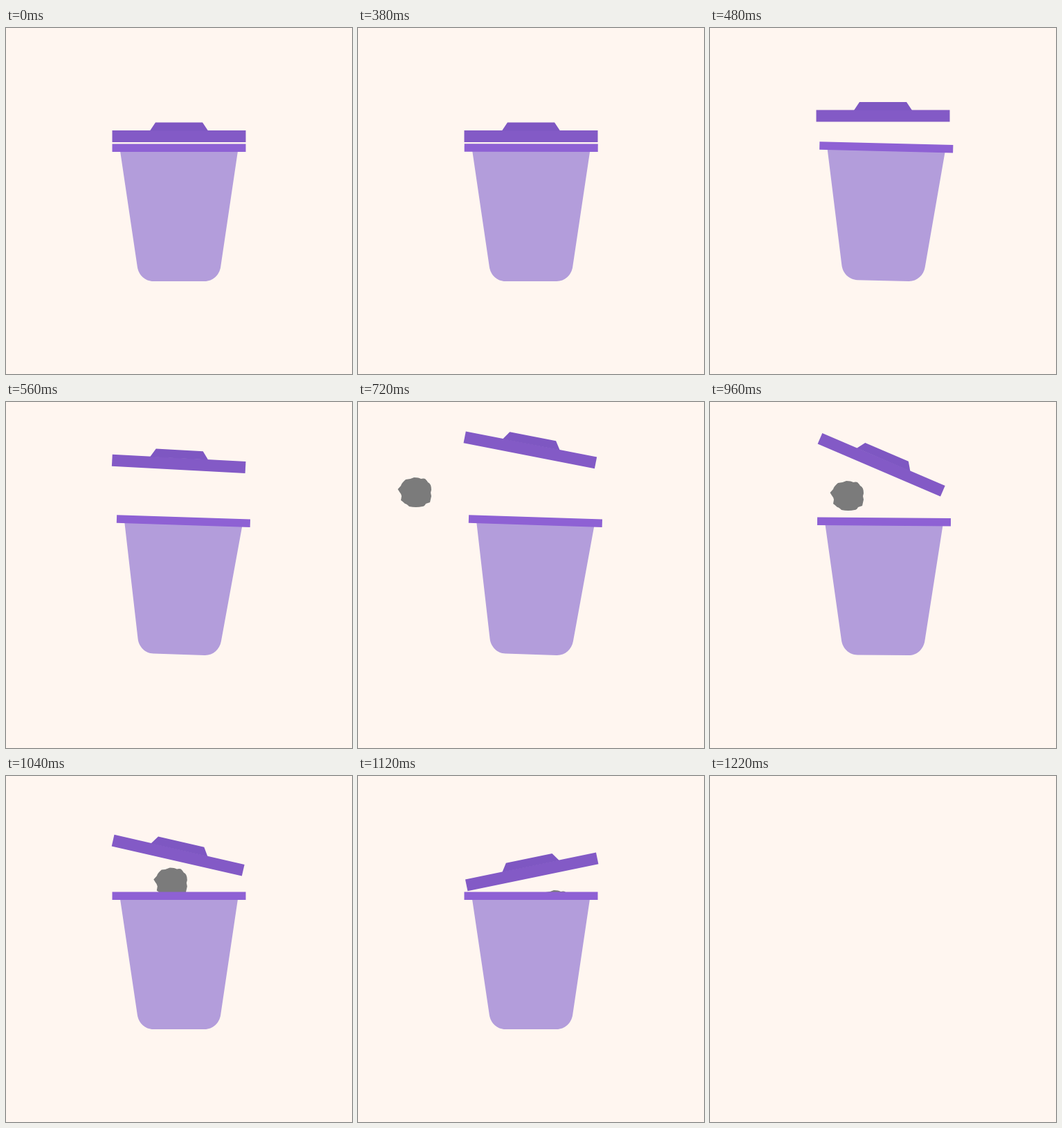
Recreate the animation shown at these times as an HTML page. Size 500 by 500 pixels, loop 1240 ms.

```html
<!DOCTYPE html>
<html lang="en">
<head>
<meta charset="utf-8">
<title>Bin</title>
<style>
  html, body { margin: 0; height: 100%; overflow: hidden; background: #fff6f0; }
  svg { display: block; width: 100%; height: 100%; }
</style>
</head>
<body>
<svg viewBox="0 0 500 500">
  <g id="scene">
    <path id="ball" fill="#7b7b7b" d="M-24.5-5L-20-10Q-19-14-13-19Q-7-19-1-22Q6-22 9-20Q13-21 15-20Q18-17 19-15Q24-13 24-4L23 0L24 5L22 14L16 16Q14 20 11 20Q2 22-8 20Q-12 16-14 16Q-17 13-20 11L-19 5Q-20 1-22-1Z"/>
    <g id="bin">
      <path fill="#b39ddb" d="M165 178L189.8 345C191.5 357 201 366 213 366H287C299 366 308.5 357 310.2 345L335 178Z"/>
      <path fill="#8e61d4" d="M153.5 167.5H346.5V179H153.5Z"/>
    </g>
    <g id="lid">
      <path fill="#835ac6" d="M153.5 148H346.5V165H153.5Z"/>
      <path fill="#7e57c2" d="M208 148.5L216 136.5H284L292 148.5Z"/>
    </g>
  </g>
</svg>
<script>
  const LOOP = 1240, STEP = 20;
  const [scene, ball, bin, lid] = ['scene', 'ball', 'bin', 'lid'].map(id => document.getElementById(id));

  const linear = u => u;
  const smooth = u => u * u * (3 - 2 * u);

  // Keys are [time, value, easing towards this key].
  const binTilt = [[360, 0], [540, 1.9, smooth], [851, 1.9], [1010, 0, smooth]];
  const lidTilt = [[500, 0], [1000, 25.2], [1120, -11.7], [1200, 0]];
  const lidLift = [[375, 0], [643, -87, smooth], [860, -87], [900, -83], [920, -77.5], [960, -65.3], [1120, -18], [1200, 0]];

  function track(keys, t) {
    const i = keys.findIndex(key => key[0] > t);
    if (i < 0) return keys.at(-1)[1];
    if (!i) return keys[0][1];
    const [t0, v0] = keys[i - 1], [t1, v1, ease = linear] = keys[i];
    return v0 + (v1 - v0) * ease((t - t0) / (t1 - t0));
  }

  // Polynomial through all the given points.
  const curve = (points, t) => points.reduce((sum, [a, v]) =>
    sum + points.reduce((w, [b]) => b === a ? w : w * (t - b) / (a - b), v), 0);

  const flight = [[560, -27], [720, 82], [960, 198], [1120, 284]];
  const arc = [[82, 131], [198, 136], [284, 187]];

  const show = (el, on) => el.setAttribute('visibility', on ? 'inherit' : 'hidden');
  const move = (el, transform) => el.setAttribute('transform', transform);

  function draw(now) {
    const t = Math.floor(now % LOOP / STEP) * STEP;
    scene.setAttribute('visibility', t < 1220 ? 'visible' : 'hidden');
    show(ball, t >= 560 && t < 1140);
    const x = curve(flight, t);
    move(ball, `translate(${x} ${curve(arc, x)})`);
    move(bin, `rotate(${track(binTilt, t)} 288 366)`);
    move(lid, `translate(0 ${track(lidLift, t)}) rotate(${track(lidTilt, t)} 250 150.5)`);
  }

  let start;
  function frame(now) {
    start ??= now;
    draw(now - start);
    requestAnimationFrame(frame);
  }
  draw(0);
  requestAnimationFrame(frame);
</script>
</body>
</html>
```
